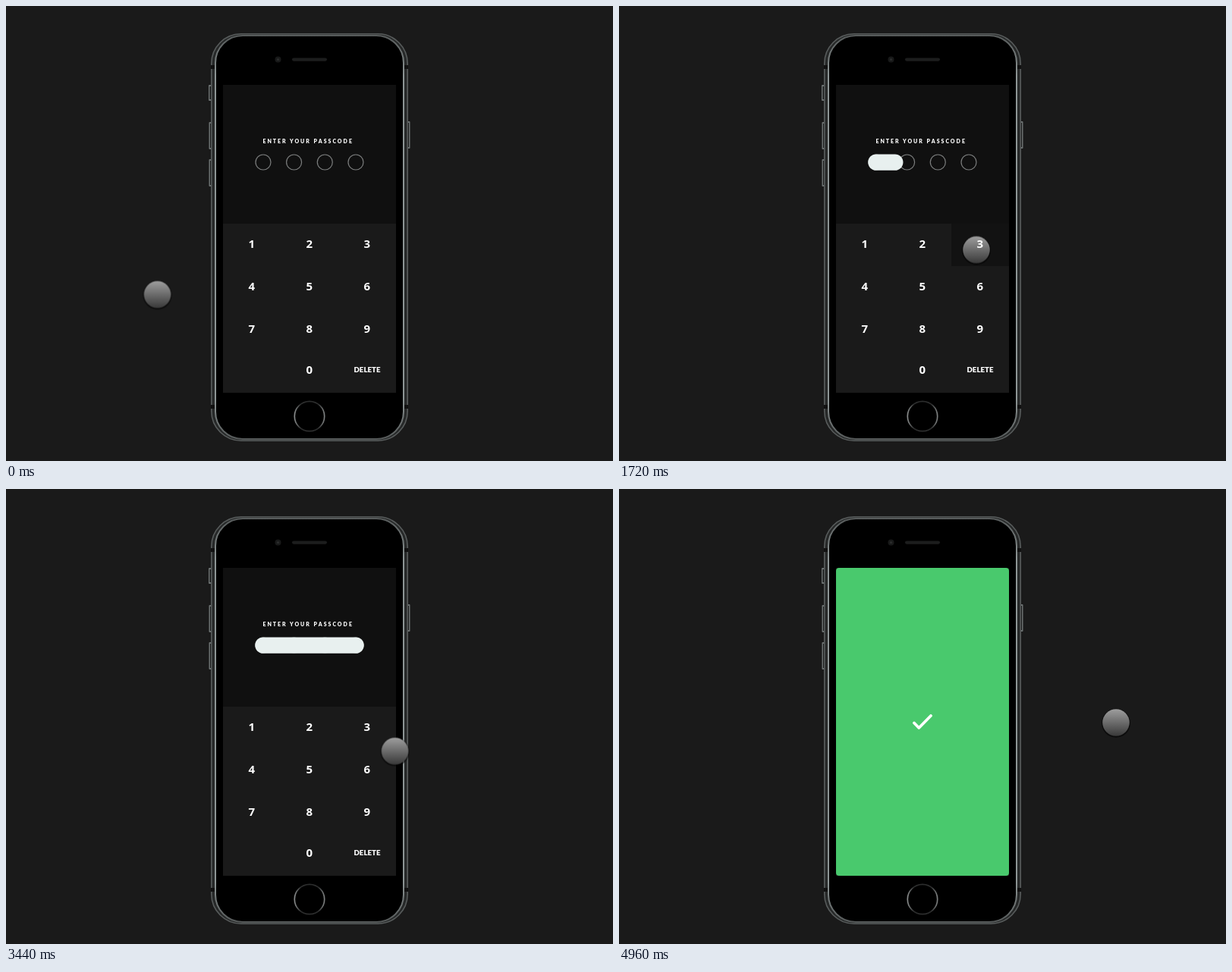
Write an HTML page that moves like this. It is 800x600 px and loops after 6000 ms.

```html
<!DOCTYPE html>
<html lang="en">
<head>
<meta charset="utf-8">
<title>Passcode unlock</title>
<style>
html, body { margin: 0; width: 100%; height: 100%; overflow: hidden; background: #1a1a1a; }
svg { display: block; width: 100vw; height: 100vh; }
text { fill: #fff; text-anchor: middle; }
.title, .word { font-family: Lato, sans-serif; font-weight: 900; }
.title { font-size: 7px; letter-spacing: 2px; text-anchor: start; }
.word { font-size: 9.7px; }
.digit { font: 700 15px "Open Sans", sans-serif; }

.ball, .pill, .dots, .press, .flood, .tick { animation: 6s linear infinite; }

/* 1% = 60 ms */
.ball { animation-name: move; animation-timing-function: cubic-bezier(.37, 0, .63, 1); }
@keyframes move {
  0% { transform: translate(199.5px, 380.5px); }
  7.33%, 13.92% { transform: translate(309px, 365.5px); }
  24.67%, 29.67% { transform: translate(471px, 321.5px); }
  38%, 41.33% { transform: translate(411px, 415px); }
  49.33%, 53% { transform: translate(409px, 373px); }
  62.67%, 100% { transform: translate(655px, 308px); }
}

.pill { y: 195.4px; height: 21.4px; animation-name: fill; animation-timing-function: cubic-bezier(.16, 1, .3, 1); }
@keyframes fill {
  0%, 12% { x: 328.2px; width: 21.4px; fill: #e8f0ef; opacity: 0; }
  17%, 28% { x: 328.2px; width: 21.4px; opacity: 1; }
  33%, 40% { x: 328.2px; width: 62.1px; }
  45%, 50.67% { x: 328.2px; width: 103px; }
  55.67% { x: 328.2px; width: 143.6px; }
  60% { x: 328.2px; width: 143.6px; fill: #e8f0ef; animation-timing-function: cubic-bezier(.37, 0, .63, 1); }
  65%, 100% { x: 389.3px; width: 21.4px; fill: #49c96d; opacity: 1; }
}

.dots { fill: none; stroke: #7c7e7e; stroke-width: 1.2; animation-name: hide; }
@keyframes hide {
  0%, 59.9% { opacity: 1; }
  60%, 100% { opacity: 0; }
}

.press { fill: #121212; opacity: 0; animation-name: press; }
@keyframes press {
  0%, 5.5%, 100% { opacity: 0; }
  1%, 3% { opacity: 1; }
}

.flood { fill: #49c96d; r: 0; animation-name: flood; }
@keyframes flood {
  0%, 64.6% { r: 0px; }
  64.67% { r: 10.5px; animation-timing-function: cubic-bezier(.37, 0, .63, 1); }
  72.67%, 100% { r: 330px; }
}

.tick {
  fill: none; stroke: #fff; stroke-width: 3.8; stroke-linecap: round; stroke-linejoin: round;
  stroke-dasharray: 1 2; animation-name: tick;
}
@keyframes tick {
  0%, 71.9% { stroke-dashoffset: 1; opacity: 0; }
  72% { stroke-dashoffset: 1; opacity: 1; animation-timing-function: cubic-bezier(.3, 0, .4, 1); }
  76.67%, 100% { stroke-dashoffset: 0; opacity: 1; }
}
</style>
</head>
<body>
<svg viewBox="0 0 800 600">
  <defs>
    <linearGradient id="metal" x1="0" y1="0" x2="0" y2="1">
      <stop offset="0" stop-color="#9e9e9e"/>
      <stop offset="1" stop-color="#393939"/>
    </linearGradient>
    <linearGradient id="rim" x1="0" y1="0" x2="0" y2="1">
      <stop offset="0" stop-color="#565a5a"/>
      <stop offset=".1" stop-color="#8d9595"/>
      <stop offset=".9" stop-color="#8d9595"/>
      <stop offset="1" stop-color="#565a5a"/>
    </linearGradient>
    <linearGradient id="ring" x1="0" y1="0" x2="1" y2="0">
      <stop offset="0" stop-color="#8a8d8d"/>
      <stop offset=".2" stop-color="#2c2d2d"/>
      <stop offset=".8" stop-color="#2c2d2d"/>
      <stop offset="1" stop-color="#808383"/>
    </linearGradient>
    <clipPath id="screen"><rect x="286" y="104" width="228" height="406" rx="4"/></clipPath>
  </defs>

  <!-- phone -->
  <g fill="#6d7272">
    <rect x="267" y="104" width="3.5" height="21" rx="1"/>
    <rect x="267.5" y="153" width="3" height="36" rx="1"/>
    <rect x="267.5" y="202" width="3" height="36" rx="1"/>
    <rect x="529.5" y="152" width="3" height="36" rx="1"/>
  </g>
  <g fill="#161717">
    <rect x="268.5" y="106" width="2" height="17"/>
    <rect x="269" y="155" width="2" height="32"/>
    <rect x="269" y="204" width="2" height="32"/>
    <rect x="529" y="154" width="2" height="32"/>
  </g>
  <rect x="270.8" y="36.8" width="258.4" height="536.4" rx="39" fill="#262828" stroke="#585c5c" stroke-width="1.6"/>
  <rect x="276" y="39" width="248" height="532" rx="36" fill="#000" stroke="url(#rim)" stroke-width="2"/>
  <rect x="278.5" y="41" width="243" height="528" rx="35" fill="#000"/>
  <g fill="#111">
    <rect x="270" y="78" width="5" height="5"/>
    <rect x="525" y="78" width="5" height="5"/>
    <rect x="270" y="526" width="5" height="5"/>
    <rect x="525" y="526" width="5" height="5"/>
  </g>
  <circle cx="358.5" cy="70.5" r="4" fill="#181919"/>
  <circle cx="358.5" cy="70.5" r="1.6" fill="#2b2d2d"/>
  <rect x="377" y="68.5" width="46" height="4.2" rx="2.1" fill="#1c1d1d"/>
  <circle cx="400" cy="541" r="19.7" fill="#000" stroke="url(#ring)" stroke-width="1.7"/>

  <!-- screen -->
  <rect x="286" y="104" width="228" height="183" fill="#101010"/>
  <rect x="286" y="287" width="228" height="223" fill="#1a1a1a"/>
  <g id="presses"></g>
  <g class="dots">
    <circle cx="339" cy="206" r="10"/>
    <circle cx="379.6" cy="206" r="10"/>
    <circle cx="420.3" cy="206" r="10"/>
    <circle cx="461" cy="206" r="10"/>
  </g>
  <rect class="pill" rx="10.7"/>

  <g class="ball">
    <circle cy=".8" r="19" fill="#000" opacity=".55"/>
    <circle r="17.8" fill="url(#metal)"/>
  </g>

  <text class="title" x="338.4" y="180.6">ENTER YOUR PASSCODE</text>
  <g id="keys"><text class="word" x="476" y="482.6">DELETE</text></g>

  <g clip-path="url(#screen)"><circle class="flood" cx="400" cy="206"/></g>
  <path class="tick" pathLength="1" d="M389 308.5L395.3 315L411 299"/>
</svg>
<script>
const add = (parent, tag, attrs, text = '') => {
  const el = document.createElementNS('http://www.w3.org/2000/svg', tag);
  for (const name in attrs) el.setAttribute(name, attrs[name]);
  el.textContent = text;
  document.getElementById(parent).append(el);
};

const baselines = [318.9, 374.9, 430.6, 485];
'123456789 0'.split('').forEach((digit, i) => {
  add('keys', 'text', { class: 'digit', x: 323.8 + 76 * (i % 3), y: baselines[Math.floor(i / 3)] }, digit);
});

// column, row and start time in seconds of each key press
[[0, 1, .66], [2, 0, 1.62], [1, 2, 2.34], [1, 1, 2.98]].forEach(([col, row, start]) => {
  add('presses', 'rect', {
    class: 'press', x: 286 + 76 * col, y: 287 + 55.75 * row,
    width: 76, height: 55.75, style: `animation-delay: ${start}s`
  });
});
</script>
</body>
</html>
```
